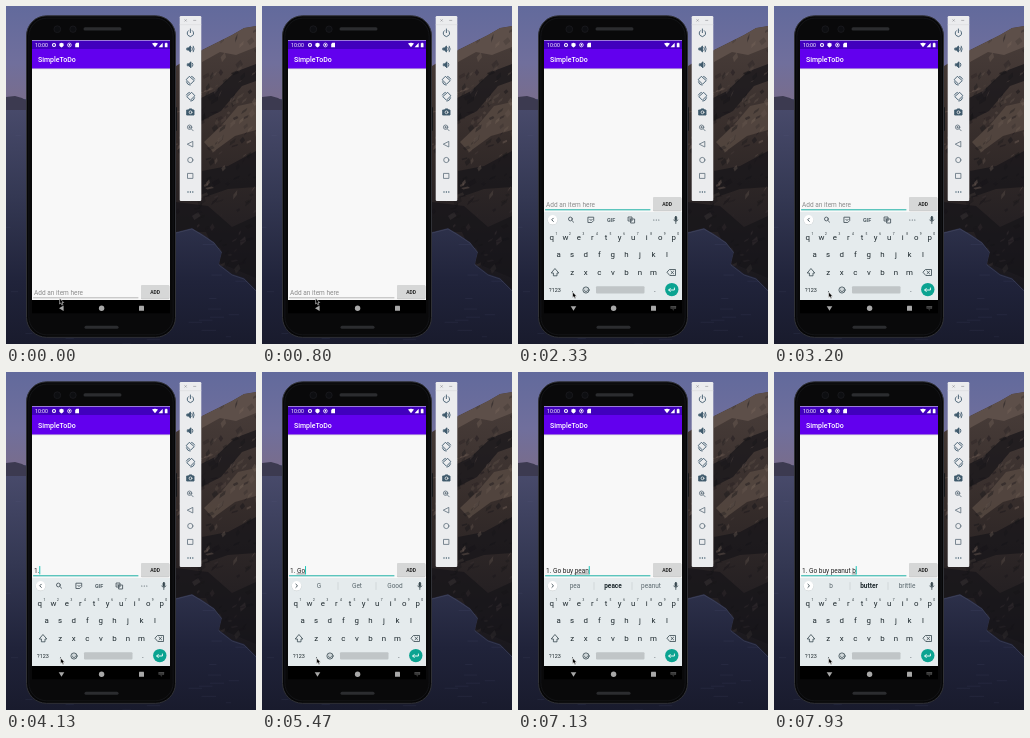
Recreate the animation shown at these times as an HTML page. Size 250 by 338 pixels, loop 8000 ms.

```html
<!DOCTYPE html>
<html lang="en">
<head>
<meta charset="utf-8">
<title>To-do app demo</title>
<style>
html, body { margin: 0; width: 100%; height: 100%; overflow: hidden; background: #20283b; }
svg { display: block; width: 100%; height: 100%; }
text { font-family: Roboto, sans-serif; white-space: pre; }
.line { fill: none; stroke-linecap: round; stroke-linejoin: round; }
.mid { text-anchor: middle; }
</style>
</head>
<body>
<svg viewBox="0 0 250 338">
  <defs>
    <linearGradient id="sky" x2="0" y2="1"><stop stop-color="#626a9c"/><stop offset=".6" stop-color="#706f9c"/><stop offset="1" stop-color="#786d8d"/></linearGradient>
    <linearGradient id="sea" x2="0" y2="1"><stop stop-color="#4a4c6d"/><stop offset=".4" stop-color="#343853"/><stop offset=".75" stop-color="#20233a"/><stop offset="1" stop-color="#191b2d"/></linearGradient>
    <linearGradient id="rock" x2="0" y2="1"><stop stop-color="#4c403c"/><stop offset=".45" stop-color="#352c2a"/><stop offset="1" stop-color="#17161c"/></linearGradient>
    <clipPath id="cliffClip"><path d="M250 20L238 22L226 29L214 35L196 44L170 60V226L186 222L196 228L208 236L216 246L213 258L226 268L238 272L250 284Z"/></clipPath>
    <clipPath id="screenClip"><path d="M26 34H164V294H26Z"/></clipPath>
  </defs>

  <path fill="url(#sky)" d="M0 0H250V94H0Z"/>
  <path fill="url(#sea)" d="M0 93H250V338H0Z"/>
  <path fill="#3c3a50" d="M0 91L9 90L16 92L21 95V104H0Z"/>
  <g id="waves" class="line" stroke="#62668a" stroke-width=".6" opacity=".2"></g>
  <path class="line" stroke="#6a6c80" opacity=".25" d="M170 227L186 223L196 229L208 237L216 247L213 259L226 269L238 273L250 285"/>
  <g clip-path="url(#cliffClip)">
    <path fill="url(#rock)" d="M168 10H250V290H168Z"/>
    <path fill="#5d4f49" d="M250 20L238 22L214 35L196 44V56L214 46L230 49L250 41Z"/>
    <path fill="#584a43" opacity=".8" d="M250 96L232 100L216 119L198 136L207 146L229 130L250 124Z"/>
    <path fill="#161519" opacity=".7" d="M250 58L229 66L209 85L195 92V115L215 105L236 80L250 75ZM250 145L222 160L196 165V192L222 183L250 181ZM170 196L202 200L226 221L250 210V272L214 257L200 226L170 226Z"/>
    <g id="facets"></g>
  </g>

  <!-- phone -->
  <rect x="168" y="101" width="3" height="24" rx="1" fill="#17181a"/>
  <rect x="20.5" y="9.8" width="149" height="321.5" rx="20" fill="#060607" stroke="#303136"/>
  <rect x="22.8" y="12.1" width="144.4" height="316.8" rx="18" fill="#09090a" stroke="#1e1f22" stroke-width=".6"/>
  <rect x="77.5" y="21.2" width="38" height="3.4" rx="1.7" fill="#2b2c2f"/>
  <rect x="78.5" y="319.7" width="34" height="3" rx="1.5" fill="#2b2c2f"/>
  <g fill="#0d0e11" stroke="#1d1e22" stroke-width=".7"><circle cx="51.3" cy="23.2" r="3.4"/><circle cx="67" cy="23.2" r="3.2"/></g>
  <path fill="#f8f8f8" d="M26 34H164V307H26Z"/>
  <path fill="#4100bd" d="M26 34.5H164V43.5H26Z"/>
  <path fill="#6200ee" d="M26 43H164V62.5H26Z"/>
  <path fill="#000" opacity=".15" d="M26 62.5H164V63.3H26Z"/>
  <text x="29" y="41" font-size="5.2" fill="#fff">10:00</text>
  <g fill="#fff">
    <circle cx="48" cy="39" r="1.5" fill="none" stroke="#fff" stroke-width="1.1"/>
    <path d="M55.5 36.7L57.6 37.5V39.2Q57.4 40.7 55.5 41.4Q53.6 40.7 53.4 39.2V37.5Z"/>
    <circle cx="63.4" cy="39" r="1.9" fill="none" stroke="#fff" stroke-width=".7"/>
    <path d="M62.8 38H64.2V39.4H63.4V40.3H62.8ZM70.4 36.8H73V41.2H69.2V38ZM146 37.5Q149 35.8 152 37.5L149 41.2ZM156.7 36.8V41.2H152.6ZM158.8 37.3H159.5V36.7H160.8V37.3H161.5V41.3H158.8Z"/>
  </g>
  <text x="32" y="55.7" font-size="7" font-weight="500" fill="#fff">SimpleToDo</text>

  <g clip-path="url(#screenClip)">
    <g id="field">
      <text id="hint" x="28" y="288.8" font-size="6.5" fill="#8c8c8c">Add an item here</text>
      <text id="entry" x="28" y="288.8" font-size="6.5" fill="#222"></text>
      <path id="compose" class="line" stroke="#333" stroke-width=".5"/>
      <path id="underline" class="line"/>
      <path id="caret" class="line" stroke="#03bfb0" stroke-width=".9"/>
      <rect x="135" y="279.7" width="28.4" height="13.6" rx="1" fill="#000" opacity=".2"/>
      <rect x="135" y="279" width="28.4" height="13.6" rx="1" fill="#d6d7d7"/>
      <text class="mid" x="149.2" y="287.8" font-size="5" font-weight="600" fill="#222">ADD</text>
    </g>
    <g id="keyboard">
      <path fill="#e5ebed" d="M26 206H164V295H26Z"/>
      <circle cx="34.6" cy="214.2" r="5" fill="#000" opacity=".1"/>
      <circle cx="34.6" cy="213.8" r="4.8" fill="#fff"/>
      <path id="chevron" class="line" stroke="#37474f" stroke-width=".9"/>
      <g id="tools" class="line" stroke="#4d5a61" stroke-width=".9">
        <circle cx="52.4" cy="213" r="1.9"/><path d="M53.9 214.5L55.6 216.2"/>
        <path d="M70.3 211.2H75.7V214.5L73.8 216.5H70.3ZM71.8 213.8Q73 215 74.2 213.8"/>
        <path d="M110.5 211H114V215H110.5ZM113 213H116.6V217H113ZM111.5 213H113"/>
        <path stroke-width="1.2" d="M135.8 214h.01M138.3 214h.01M140.8 214h.01"/>
        <text class="mid" x="93" y="216" font-size="5.4" font-weight="700" fill="#4d5a61" stroke="none">GIF</text>
      </g>
      <g id="suggestions">
        <path class="line" stroke="#c3cbce" stroke-width=".6" d="M76 210.5V217.5M114 210.5V217.5"/>
        <g font-size="6.5" fill="#4d5a61" class="mid"><text x="57" y="216.4"/><text x="95" y="216.4"/><text x="133" y="216.4"/></g>
      </g>
      <g class="line" stroke="#37474f" stroke-width=".8">
        <rect x="157" y="210.6" width="1.7" height="4" rx=".8" fill="#37474f"/><path d="M155.8 214Q157.8 217.2 159.8 214M157.8 216V217.5"/>
        <path d="M37.2 262.8L40.8 267H39V269.8H35.4V267H33.6Z"/>
        <path d="M151.8 263.5H157.5V269.5H151.8L149.2 266.5ZM153 265.2L155.6 267.8M155.6 265.2L153 267.8"/>
        <circle cx="68" cy="284" r="3.1"/><path d="M66.3 284.8Q68 286.6 69.7 284.8M66.9 283h.01M69.1 283h.01"/>
      </g>
      <g id="keys" class="mid" fill="#1d282d"></g>
      <rect x="78" y="280.2" width="48.5" height="7.3" rx="1" fill="#c0c5c7"/>
      <circle cx="153.8" cy="283.6" r="6.7" fill="#0ba391"/>
      <path class="line" stroke="#fff" stroke-width=".9" d="M156.4 282V284H150.8M152.3 282.4L150.7 284L152.3 285.6"/>
    </g>
  </g>

  <path d="M26 294H164V307.3H26Z"/>
  <path id="back" fill="#a8a8a8" d="M53 302.3L57.6 299.5V305.1Z"/>
  <circle cx="95.6" cy="302.3" r="2.7" fill="#a8a8a8"/>
  <rect x="133" y="299.8" width="5" height="5" rx=".4" fill="#a8a8a8"/>
  <g id="imeIcon" fill="#585858"><rect x="152.5" y="300" width="5.6" height="2.8" rx=".5"/><path class="line" stroke="#111" stroke-width=".5" stroke-dasharray=".4 .8" d="M153.2 301H157.6M153.2 302H157.6"/><path d="M154.2 303.5H156.4L155.3 304.6Z"/></g>

  <!-- emulator controls -->
  <rect x="173.7" y="10" width="21.6" height="185" rx="1.2" fill="#ebecee"/>
  <path class="line" stroke="#8b8b91" stroke-width=".6" d="M178.8 13.6L180.4 15.2M180.4 13.6L178.8 15.2M187.6 14.4H189.8"/>
  <path class="line" stroke="#d4d4d9" stroke-width=".5" d="M174 18.7H195"/>
  <g class="line" stroke="#3f5a6c" stroke-width=".9">
    <path d="M182.4 24.7A3.2 3.2 0 1 0 186.4 24.7M184.4 23V26.6"/>
    <path fill="#3f5a6c" d="M181.2 42H182.3L184.5 40V46L182.3 44H181.2ZM181.7 57.8H182.8L185 55.8V61.8L182.8 59.8H181.7Z"/>
    <path d="M186 41.4Q187 43 186 44.6M187.3 40.2Q189.1 43 187.3 45.8M186.5 57.3Q187.5 58.8 186.5 60.3"/>
    <path id="rotate" d="M183.6 70.6L188.2 74.6L184.6 78.2L180.4 74ZM180.4 75.8A4.4 4.4 0 0 0 184 79.2M185.6 70.4A4.4 4.4 0 0 1 188.6 73"/>
    <use href="#rotate" transform="matrix(-1 0 0 1 369 16)"/>
    <path fill="#3f5a6c" d="M181 104H182.6L183.3 102.9H185.8L186.5 104H188V109H181Z"/>
    <circle cx="184.5" cy="106.3" r="1.4" stroke="#ebecee" stroke-width=".8"/>
    <g stroke="#5d6e7a" stroke-width=".8">
      <circle cx="183.6" cy="121.2" r="2.2"/><path d="M185.3 122.9L187.2 124.8M182.8 121.2H184.4M183.6 120.4V122"/>
      <path d="M181.6 138L186.8 135.4V140.6ZM181.9 167.4H186.9V172.4H181.9Z"/><circle cx="184.3" cy="154" r="2.6"/>
    </g>
    <path stroke-width="1.4" d="M182 186h.01M184.4 186h.01M186.8 186h.01"/>
  </g>
  <path id="mouse" d="M0 0V5.7L1.3 4.6L2.3 6.8L3.3 6.3L2.4 4.2H4.1Z" stroke="#fff" stroke-width=".5"/>
</svg>
<script>
const $ = id => document.getElementById(id);
const LOOP = 8000, FOCUS = 1530, RAISE = 1670, TEXT_X = 28;

// [time, text, start of the word being composed]
const typed = [
  [3730, '1'], [3930, '1.'], [4530, '1. '], [5270, '1. G', 3], [5440, '1. Go', 3],
  [5730, '1. Go '], [6000, '1. Go b', 6], [6150, '1. Go bu', 6], [6370, '1. Go buy', 6], [6530, '1. Go buy '],
  [6770, '1. Go buy p', 10], [6870, '1. Go buy pe', 10], [6990, '1. Go buy pea', 10], [7110, '1. Go buy pean', 10],
  [7240, '1. Go buy peanu', 10], [7380, '1. Go buy peanut', 10], [7570, '1. Go buy peanut '], [7800, '1. Go buy peanut b', 17]
];
// [time, left, middle, right]
const offers = [
  [5340, 'G', 'Get', 'Good'], [5540, 'Go', 'Good', 'Going'], [5800, 'to', 'back', 'and'],
  [6070, 'b', 'but', 'be'], [6220, 'bu', 'but', 'buy'], [6440, 'but', 'buy', 'buying'], [6600, 'a', 'the', 'some'],
  [6840, 'p', 'pizza', 'please'], [6950, 'pe', 'people', 'pet'], [7070, 'pea', 'peace', 'peanut'],
  [7190, 'pean', 'peanut', 'peanuts'], [7450, 'peanuts', 'peanut', 'Peanut'], [7640, 'butter', 'oil', 'and'],
  [7870, 'b', 'butter', 'brittle']
];

let seed = 11;
const rnd = (a, b) => {
  seed = seed * 16807 % 2147483647;
  return a + (b - a) * seed / 2147483647;
};
const latest = (list, t) => list.filter(e => e[0] <= t).pop();
const ease = (t, a, b) => {
  const u = Math.min(1, Math.max(0, (t - a) / (b - a)));
  return u * u * (3 - 2 * u);
};
const show = (id, on) => $(id).setAttribute('display', on ? 'inline' : 'none');
const attr = (id, name, value) => $(id).setAttribute(name, value);

function drawScenery() {
  let facets = '', waves = '';
  for (let i = 0; i < 220; i++) {
    const x = rnd(168, 250), y = rnd(20, 285), w = rnd(2, 7), h = rnd(1, 5);
    const color = rnd(0, 1) < .6 ? '#141317' : y < 190 ? '#75645a' : '#40383a';
    facets += `<path fill="${color}" opacity="${rnd(.15, .45)}" d="M${x} ${y}l${w} ${-h}l${rnd(-2, 3)} ${h}l${-w} ${h}Z"/>`;
  }
  for (let i = 0; i < 70; i++) waves += `<path d="M${rnd(-5, 250)} ${rnd(106, 338)}h${rnd(3, 14)}"/>`;
  $('facets').innerHTML = facets;
  $('waves').innerHTML = waves;
}

function drawKeys() {
  const key = (s, x, y, size) => `<text x="${x}" y="${y}" font-size="${size}">${s}</text>`;
  const row = (s, x, y) => [...s].map((c, i) => key(c, x + i * 13.55, y, 7.9)).join('');
  $('keys').innerHTML = row('qwertyuiop', 33.8, 233.5) + row('asdfghjkl', 40.6, 251.2) + row('zxcvbnm', 54.2, 269.2) +
    [...'1234567890'].map((c, i) => key(c, 38.3 + i * 13.55, 228.6, 3.2)).join('') +
    key('?123', 37, 286, 5.5) + key(',', 54.4, 286, 7) + key('.', 137, 286, 7);
}

function render(t) {
  const focused = t >= FOCUS, raised = t >= RAISE + 60;
  const [at, text, word] = latest(typed, t) || [FOCUS, ''];
  const offer = latest(offers, t);

  attr('field', 'transform', `translate(0 ${raised ? -88 : 0})`);
  attr('keyboard', 'transform', `translate(0 ${90 * (1 - ease(t, RAISE, RAISE + 200))})`);
  show('keyboard', t >= RAISE);
  show('imeIcon', focused);
  attr('back', 'transform', raised ? 'rotate(-90 55.5 302.3)' : '');

  show('hint', !text);
  $('entry').textContent = text;
  const width = n => n ? $('entry').getSubStringLength(0, n) : 0;
  const end = TEXT_X + width(text.length);
  attr('caret', 'd', `M${end + .4} 282.5V290`);
  show('caret', focused && (t - at) % 1000 < 500);
  show('compose', word !== undefined);
  if (word !== undefined) attr('compose', 'd', `M${TEXT_X + width(word)} 289.9H${end}`);
  attr('underline', 'd', 'M27.5 291.8H132');
  attr('underline', 'stroke', focused ? '#03a99c' : '#8a8a8a');
  attr('underline', 'stroke-width', focused ? .9 : .6);

  show('tools', !offer);
  show('suggestions', offer);
  attr('chevron', 'd', offer ? 'M33.9 212.2L35.5 213.8L33.9 215.4' : 'M35.3 212.2L33.7 213.8L35.3 215.4');
  if (offer) document.querySelectorAll('#suggestions text').forEach((el, i) => {
    const strong = i === 1 && t > 6000;
    el.textContent = offer[i + 1];
    el.setAttribute('font-weight', strong ? 700 : 400);
    el.setAttribute('fill', strong ? '#1d282d' : '#5b686e');
  });

  const m = ease(t, 900, 1350);
  attr('mouse', 'transform', `translate(${53.6 + m} ${292.3 - 6.3 * m})`);
}

drawScenery();
drawKeys();
const start = performance.now();
function tick() {
  render((performance.now() - start) % LOOP);
  requestAnimationFrame(tick);
}
tick();
</script>
</body>
</html>
```
